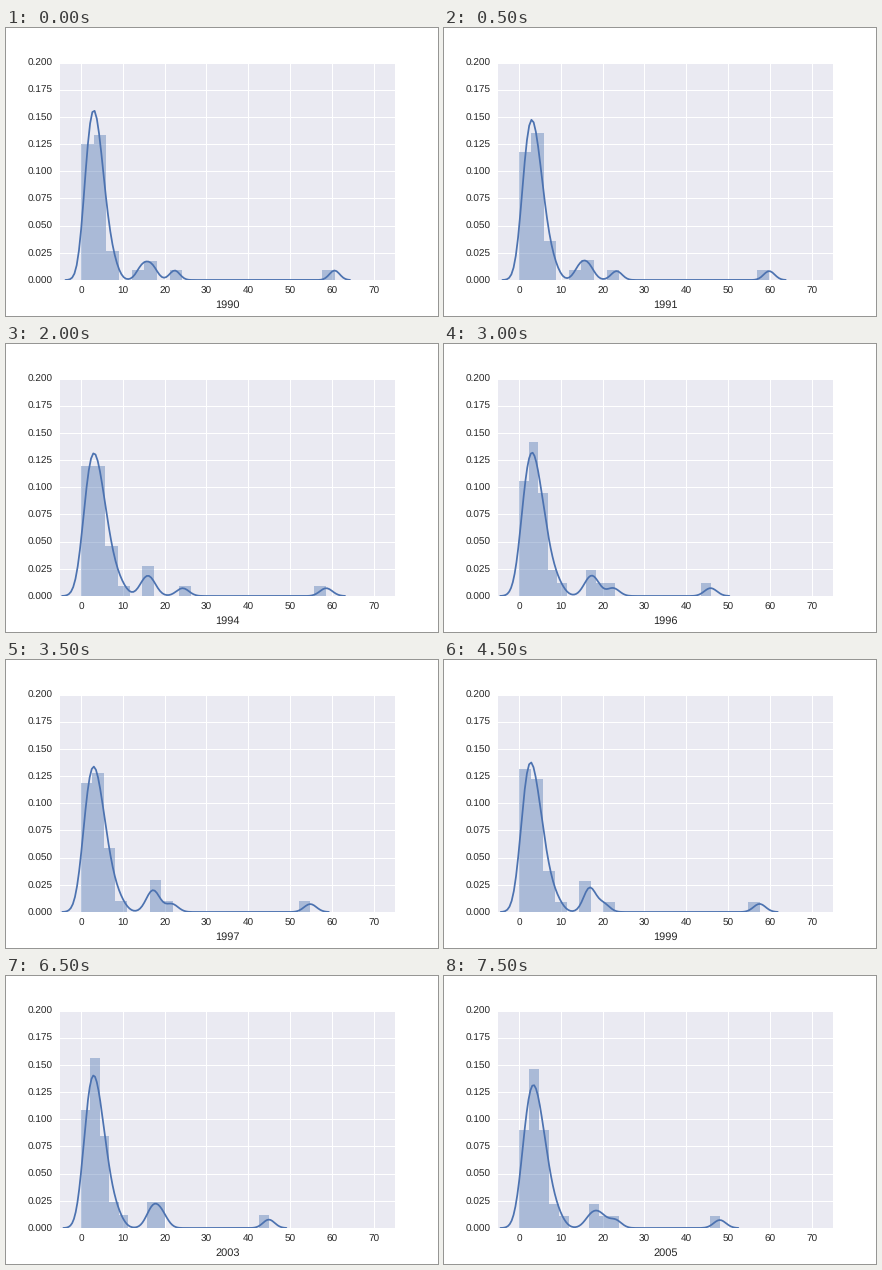
These frames come from a looping animation (432 px wide and 288 px high, 8 s). A matplotlib script:

```python
import matplotlib.pyplot as plt
import numpy as np
from matplotlib.animation import FuncAnimation

BLUE = "#4C72B0"
BINS = 20
FIRST_YEAR = 1990
CORE = 32

# Farthest sample in each year.
FAR = [60.6, 59.8, 76.8, 77.3, 58.6, 56.9, 45.8, 54.8,
       60.4, 57.5, 61.5, 48.5, 51.5, 44.9, 43.3, 48]

# Slowly drifting parameters, interpolated between key years.
KEYS = [0, 3, 6, 9, 11, 13, 15]
SCALE = [4, 4.3, 4.33, 3.99, 4.15, 4.14, 4.6]
SHAPE = [2, 1.75, 1.78, 1.69, 1.98, 1.82, 1.92]
MID = [15.8, 15.3, 17.4, 16.9, 16.5, 17.4, 18.4]
MID_GAP = [1.5, 1, 1, 0.3, 1.25, 0.95, 1.5]
OUTER = [22.4, 25.2, 22.5, 20.2, 20.2, 19.7, 23]

plt.rcParams.update({
    "font.family": "Liberation Sans",
    "text.hinting": "none",
    "axes.labelcolor": ".15",
    "xtick.color": ".15",
    "ytick.color": ".15",
})


def samples(i):
    """Weibull quantiles near zero, a trio in the middle and two outliers."""
    scale, shape, mid, gap, outer = (
        np.interp(i, KEYS, track)
        for track in (SCALE, SHAPE, MID, MID_GAP, OUTER))
    p = (np.arange(CORE) + 0.5) / CORE
    core = scale * (-np.log(1 - p)) ** (1 / shape)
    return np.r_[core, mid - gap, mid, mid + gap, outer, FAR[i]]


def density(data):
    """Gaussian kernel estimate with Scott's bandwidth."""
    q1, q3 = np.percentile(data, [25, 75])
    bw = 1.059 * min(data.std(), (q3 - q1) / 1.349) * len(data) ** -0.2
    x = np.linspace(-3 * bw, data.max() + 3 * bw, 128)
    kernels = np.exp(-((x[:, None] - data) / bw) ** 2 / 2)
    return x, kernels.mean(axis=1) / (bw * np.sqrt(2 * np.pi))


fig = plt.figure(figsize=(6, 4), dpi=72, facecolor="white")
ax = fig.add_axes([0.125, 0.125, 0.775, 0.755], facecolor="#EAEAF2")
ax.set_xticks(range(0, 71, 10))
ax.set_yticks(np.linspace(0, 0.2, 9))
ax.yaxis.set_major_formatter("{x:.3f}")
ax.tick_params(length=0, pad=7, labelsize=10)
ax.spines[:].set_visible(False)
ax.set_axisbelow(True)
ax.grid(color="white", lw=1, ls="-")

rects = ax.bar(range(BINS), np.zeros(BINS), align="edge",
               color=BLUE, alpha=0.4, lw=0)
curve, = ax.plot([], [], color=BLUE, lw=1.75, solid_capstyle="round")
ax.set(xlim=(-5, 75), ylim=(0, 0.2))


def update(i):
    data = samples(i)
    heights, edges = np.histogram(data, BINS, (0, data.max()), density=True)
    for rect, left, height in zip(rects, edges, heights):
        rect.set_bounds(left, 0, edges[1], height)
    curve.set_data(*density(data))
    ax.set_xlabel(str(FIRST_YEAR + i), fontsize=11)
    return [*rects, curve]


anim = FuncAnimation(fig, update, frames=len(FAR), interval=500,
                     repeat=True, repeat_delay=0)
plt.show()
```
